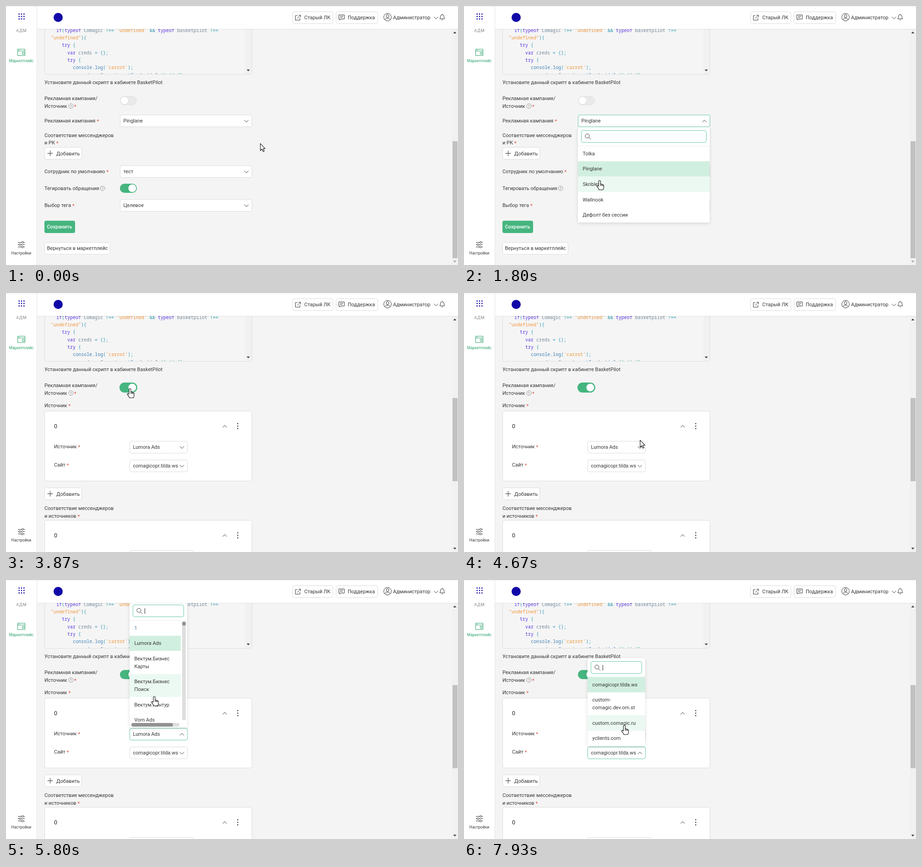
An HTML page with a canvas that plays this animation: 988 px wide and 567 px high, repeating every 8000 ms.

```html
<!DOCTYPE html>
<html lang="ru">
<head>
<meta charset="utf-8">
<title>Настройки интеграции</title>
<style>
html, body { margin: 0; width: 100%; height: 100%; overflow: hidden; background: #f4f4f4; }
canvas { display: block; width: 100vw; height: 100vh; }
</style>
</head>
<body>
<canvas id="stage" width="988" height="567"></canvas>
<script>
const c = document.getElementById('stage').getContext('2d');
const LOOP = 8000, INK = '#363636', GREEN = '#46b57f', MINT = '#68cba0', LINE = '#dcdcdc', BLUE = '#1208a8';
const SANS = 'Roboto, sans-serif', MONO = '"Noto Sans Mono", monospace';

// Pointer stops: time, x, y
const PATH = [[200, 556, 301], [870, 400, 254], [1070, 400, 254], [1800, 296.5, 382], [1870, 294, 387],
  [1930, 292, 391], [2070, 292, 391], [2800, 147.5, 307], [2930, 147.5, 307], [3330, 271, 209],
  [3870, 271, 209], [4670, 385, 322], [4800, 385, 322], [5070, 372, 330], [5270, 372, 330],
  [5800, 324, 255], [6070, 318, 268], [6130, 318, 268], [6670, 415, 311], [6930, 394, 363],
  [7200, 380, 375], [7470, 380, 375], [7930, 350.5, 318]];

const MENUS = {
  campaign: { x: 249, y: 265, w: 288, h: 209, list: 306, open: 1070, close: 2070, picked: 1,
    items: ['Tolka', 'Pinglane', 'Skriblet', 'Wallnook', 'Дефолт без сессии'] },
  origin: { x: 270, y: 48, w: 126, h: 275, list: 88, open: 5270, close: 6130, picked: 1, up: true, bars: true,
    items: ['1', 'Lumora Ads', 'Вектум.Бизнес|Карты', 'Вектум.Бизнес|Поиск', 'Вектум.Контур', 'Vorn Ads'] },
  site: { x: 270, y: 171, w: 126, h: 192, list: 212, open: 7470, close: LOOP + 1, picked: 0, up: true,
    items: ['comagicopr.tilda.ws', 'custom-|comagic.dev.orn.st', 'custom.comagic.ru', 'yclients.com'] }
};

const CODE_COLORS = { k: '#5a35e0', n: '#71879a', s: '#f0953a', p: '#2f9bb0', f: '#3d7fb5' };
// column, then "color:piece" runs
const CODE = [
  [2, 'k:if', 'p:(', 'k:typeof', 'n: Comagic ', 'p:!== ', "s:'undefined'", 'p: && ', 'k:typeof', 'n: basketpilot ', 'p:!=='],
  [0, 's:"undefined"', 'p:){'],
  [4, 'k:try', 'p: {'],
  [6, 'k:var', 'n: creds ', 'p:= {};'],
  [6, 'k:try', 'p: {'],
  [8, 'f:console.log', 'p:(', "s:'carrot'", 'p:);'],
  [10, 'n:creds ', 'p:= ', 'n:Comagic', 'f:.getCredentials', 'p:() || {};']
];

const ARROW = new Path2D('M0 0V15.5L3.6 12.2 6 17.8 8.5 16.7 6.1 11.3H10.5Z');
const HAND = new Path2D('M-2 12V2q0-2 2-2t2 2V8q1.5-1.2 2.5.5 1.5-.8 2.3.7 1.8-.2 2.2 1.5V15q0 3-1.6 5.5H-1Q-2.5 16.5-5.5 13.5q-.9-2 .5-2.4 1.7-.1 3 1.9M2 8v4M4.5 8.5v3.5M6.8 9.2v3');

let t, mx, my, hot;

const clamp = v => Math.max(0, Math.min(1, v));
const within = (x, y, w, h, pad = 0) => mx >= x - pad && mx < x + w + pad && my >= y - pad && my < y + h + pad;

function pointerAt(time) {
  const i = PATH.findIndex(p => p[0] > time);
  if (i < 1) return PATH[i < 0 ? PATH.length - 1 : 0].slice(1);
  const [t0, x0, y0] = PATH[i - 1], [t1, x1, y1] = PATH[i];
  const u = (time - t0) / (t1 - t0), e = u * u * (3 - 2 * u);
  return [x0 + (x1 - x0) * e, y0 + (y1 - y0) * e];
}

function fill(x, y, w, h, color) {
  c.fillStyle = color;
  c.fillRect(x, y, w, h);
}

// A border lies inside the given edges
function box(x, y, w, h, r, color, border) {
  const inset = border ? .5 : 0;
  c.beginPath();
  c.roundRect(x + inset, y + inset, w - 2 * inset, h - 2 * inset, r);
  c.fillStyle = color;
  c.fill();
  if (!border) return;
  c.strokeStyle = border;
  c.lineWidth = 1;
  c.stroke();
}

function path(d, x = 0, y = 0, color = INK, width = 1) {
  c.save();
  c.translate(x, y);
  c.strokeStyle = color;
  c.lineWidth = width;
  c.stroke(new Path2D(d));
  c.restore();
}

function dot(x, y, r, color) {
  c.beginPath();
  c.arc(x, y, r, 0, 7);
  c.fillStyle = color;
  c.fill();
}

// y is the middle of the capitals; returns the right end
function text(s, x, y, size = 11, color = INK, align = 'left', weight = 400, family = SANS) {
  c.font = `${weight} ${size}px ${family}`;
  c.textAlign = align;
  c.fillStyle = color;
  c.fillText(s, x, Math.round(y + size * .36));
  return x + c.measureText(s).width;
}

function label(s, x, y, { help, star = true } = {}) {
  let end = text(s, x, y);
  if (help) {
    c.beginPath();
    c.arc(help, y, 5, 0, 7);
    c.strokeStyle = '#8c8c8c';
    c.lineWidth = .9;
    c.stroke();
    text('?', help, y, 8, '#777', 'center');
    end = help + 4;
  }
  if (star) text('*', end + 3, y + 1, 11, '#e0473e');
}

const chevron = (x, y, up, color = INK) => path(up ? 'M-4.5 2.3L0-2.3 4.5 2.3' : 'M-4.5-2.3L0 2.3 4.5-2.3', x, y, color);

function select(s, x, y, w, h = 27, menu) {
  const open = menu && t >= menu.open && t < menu.close, over = within(x, y, w, h);
  hot ||= over;
  box(x, y, w, h, 3.5, '#fff', open || over ? MINT : LINE);
  text(s, x + 7.5, y + 13.2);
  chevron(x + w - 12.5, y + 14, open);
}

function addButton(y) {
  hot ||= within(84, y, 82, 27, 3);
  box(84, y, 82, 27, 3.5, '#fff', LINE);
  path('M-6 0H6M0-6V6', 96.5, y + 13.5);
  text('Добавить', 110, y + 13.5, 11.2);
}

function toggle(y, on, focus) {
  const g = focus ? 1 : 0;
  hot ||= within(249, y, 37, 20);
  box(249, y, 37, 20, 10, '#e9e9e9', '#e2e2e2');
  c.globalAlpha = on;
  box(249 - g, y - g, 37 + 2 * g, 20 + 2 * g, 10 + g, GREEN);
  c.globalAlpha = 1;
  const x = 259 + 17 * on;
  dot(x, y + 10, 9.2, on > .5 ? GREEN : '#d5d5d5');
  dot(x, y + 10, 8.5, '#fff');
}

function card(y, h) {
  box(84, y, 454, h, 4, '#fff', LINE);
  text('0', 105, y + 33, 12.5, '#222');
  chevron(478, y + 34, true);
  for (const d of [28, 33.5, 39]) dot(506.5, y + d, 1.3, INK);
}

function dropdown(m) {
  if (t < m.open || t > m.close + 200) return;
  const p = clamp((t - m.open) / 200) * (1 - clamp((t - m.close) / 200));
  if (!p) return;
  const { x, y, w, h, list } = m, anchor = m.up ? y + h : y, row = m.bars ? 112 : w;
  hot ||= within(x, y, w, h);
  c.save();
  c.globalAlpha = p;
  c.translate(0, anchor);
  c.scale(1, .8 + .2 * p);
  c.translate(0, -anchor);
  c.shadowColor = 'rgba(0,0,0,.13)';
  c.shadowBlur = 7;
  c.shadowOffsetY = 2;
  box(x, y, w, h, 2, '#fff');
  c.shadowColor = 'transparent';

  const sy = list - 34;
  box(x + 7, sy, w - 14, 27, 3.5, '#fff', MINT);
  path('M4.5 0A4.5 4.5 0 1 1-4.5 0A4.5 4.5 0 1 1 4.5 0M3.2 3.2L7.5 7.5', x + 20.5, sy + 12.5);
  const blink = t - m.open - 130;
  if (blink >= 0 && blink % 1000 < 500) fill(x + 33, sy + 8, 1, 12, '#222');
  fill(x, list, w, 1, '#ececec');

  c.save();
  c.beginPath();
  c.rect(x, list, w, m.bars ? 222 : h);
  c.clip();
  let top = list;
  m.items.forEach((item, i) => {
    const lines = item.split('|'), next = top + 16.8 * (lines.length + 1);
    const y0 = Math.round(top), rowH = Math.round(next) - y0;
    if (i === m.picked) fill(x, y0, row, rowH, '#d1efe0');
    else if (within(x, y0, row, rowH)) fill(x, y0, row, rowH, '#ebf9f2');
    lines.forEach((s, j) => text(s, x + 10.5, top + 16.8 * (j + 1), 11, s === '1' ? '#3d7194' : INK));
    top = next;
  });
  c.restore();

  if (m.bars) {
    box(385, 91, 8, 216, 4, '#dedede');
    box(385, 91, 8, 9, 4, '#929292');
    box(274, 313, 105, 8, 4, '#dedede');
    box(274, 313, 91, 8, 4, '#929292');
  }
  c.restore();
}

function codeBlock() {
  box(84, 30, 454, 120, 3, '#f5f5f5', '#dedede');
  fill(523, 50, 14, 99, '#f1f1f1');
  c.save();
  c.beginPath();
  c.rect(85, 50, 438, 99);
  c.clip();
  CODE.forEach(([col, ...runs], i) => {
    let x = 98 + col * 6.02;
    for (const run of runs)
      x = text(run.slice(2), x, 53 + i * 16.35, 10, CODE_COLORS[run[0]], 'left', 400, MONO);
  });
  c.restore();
  triangle(529.5, 141, 1);
}

function triangle(x, y, dir, color = '#444') {
  c.fillStyle = color;
  c.beginPath();
  c.moveTo(x - 3.5, y - 2 * dir);
  c.lineTo(x + 3.5, y - 2 * dir);
  c.lineTo(x, y + 2 * dir);
  c.fill();
}

function campaignForm() {
  label('Рекламная кампания', 84, 251);
  select(t < 2070 ? 'Pinglane' : 'Skriblet', 249, 238, 289, 27, MENUS.campaign);
  label('Соответствие мессенджеров', 84, 283, { star: false });
  label('и РК', 84, 299);
  addButton(309);
  label('Сотрудник по умолчанию', 84, 362);
  select('тест', 249, 349, 289);
  label('Тегировать обращения', 84, 399, { help: 211, star: false });
  toggle(389, 1);
  label('Выбор тега', 84, 436);
  select('Целевое', 249, 423, 289);
  box(84, 470, 67, 27, 4, GREEN);
  text('Сохранить', 117, 483.5, 11, '#fff', 'center', 500);
  box(84, 517, 144, 27, 4, '#fff', LINE);
  text('Вернуться в маркетплейс', 156, 530.5, 11, INK, 'center');
  dropdown(MENUS.campaign);
}

function originForm() {
  label('Источник', 84, 246);
  card(258, 154);
  label('Источник', 105, 336);
  select(t < 6130 ? 'Lumora Ads' : 'Вектум.Контур', 270, 324, 127, 27, MENUS.origin);
  label('Сайт', 105, 376);
  select('comagicopr.tilda.ws', 270, 365, 127, 27, MENUS.site);
  addButton(426);
  label('Соответствие мессенджеров', 84, 471, { star: false });
  label('и источников', 84, 488);
  card(497, 100);
  select('', 270, 563, 140);
  dropdown(MENUS.origin);
  dropdown(MENUS.site);
}

function frameChrome(changed) {
  // page scrollbar
  fill(975, 50, 13, 517, '#f1f1f1');
  fill(976, changed ? 230 : 296, 11, changed ? 182 : 256, '#c1c1c1');
  triangle(981, 58, -1);
  triangle(981, 559.5, 1, changed ? '#444' : '#a3a3a3');

  // header
  c.shadowColor = 'rgba(0,0,0,.14)';
  c.shadowBlur = 3;
  fill(68, 0, 920, 50, '#fff');
  c.shadowColor = 'transparent';
  dot(114, 25, 10, BLUE);
  box(626, 12, 89, 27, 4, '#fff', LINE);
  path('M-1-4.5H-5.5V5.5H4.5V1M1.5-5.5H5.8V-1M5.8-5.5L-1.5 1.8', 638, 25.5);
  text('Старый ЛК', 652, 25.5);
  box(721, 12, 92, 27, 4, '#fff', LINE);
  path('M-6-5.5H6V3.5H-1.5L-4 6V3.5H-6ZM-3.5-2.5H3.5M-3.5.5H2', 733.5, 25);
  text('Поддержка', 747, 25.5);
  path('M8.3 0A8.3 8.3 0 1 1-8.3 0A8.3 8.3 0 1 1 8.3 0M3-2.5A3 3.3 0 1 1-3-2.5A3 3.3 0 1 1 3-2.5M-6 5.5Q-4 2.5-1.5 2.3H1.5Q4 2.5 6 5.5', 834, 24.5);
  text('Администратор', 846, 25.5);
  chevron(940, 26, false);
  path('M-5.5 3.5Q-3.8 2-3.8-1.5Q-3.8-5.5 0-5.5T3.8-1.5Q3.8 2 5.5 3.5ZM-1.5 5.5Q0 7 1.5 5.5M0-7V-5.5', 953.5, 24.5);

  // sidebar
  fill(0, 0, 67, 567, '#fff');
  fill(67, 0, 1, 567, '#e4e4e4');
  for (let i = 0; i < 9; i++) dot(28.7 + i % 3 * 5.3, 17.7 + Math.floor(i / 3) * 5.3, 1.4, BLUE);
  c.letterSpacing = '.8px';
  text('АДМ', 33.8, 54, 9, '#858585', 'center');
  c.letterSpacing = '0px';
  path('M-8-7H8V7H-8ZM-8-3H8M2 0H6V4H2ZM-6-5H-4', 33.5, 101.5, '#2ea36c');
  text('Маркетплейс', 33.5, 119.5, 8.5, '#2ea36c', 'center');
  path('M-7.5-5H1M5-5H7.5M-7.5 0H-5M-1 0H7.5M-7.5 5H0M4 5H7.5M5-5A2 2 0 1 1 1-5A2 2 0 1 1 5-5M-1 0A2 2 0 1 1-5 0A2 2 0 1 1-1 0M4 5A2 2 0 1 1 0 5A2 2 0 1 1 4 5', 33.5, 522.5);
  text('Настройки', 33.5, 540.5, 8.5, INK, 'center');
  fill(0, 0, 988, 1, '#ebebeb');
}

function pointer() {
  c.save();
  c.translate(mx, my);
  c.lineJoin = 'round';
  c.lineWidth = 1.1;
  c.fillStyle = '#fff';
  c.strokeStyle = '#111';
  const shape = hot ? HAND : ARROW;
  c.fill(shape);
  c.stroke(shape);
  c.restore();
}

function draw(now) {
  t = now % LOOP;
  [mx, my] = pointerAt(t);
  hot = false;
  const changed = t >= 3870;
  fill(0, 0, 988, 567, '#f4f4f4');
  codeBlock();
  text('Установите данный скрипт в кабинете BasketPilot', 84, 167);
  label('Рекламная кампания/', 84, 202, { star: false });
  label('Источник', 84, 219, { help: 142 });
  toggle(197, clamp((t - 3530) / 200), t >= 3530 && t < 4800);
  if (changed) originForm();
  else campaignForm();
  frameChrome(changed);
  pointer();
  requestAnimationFrame(draw);
}
requestAnimationFrame(draw);
</script>
</body>
</html>
```
